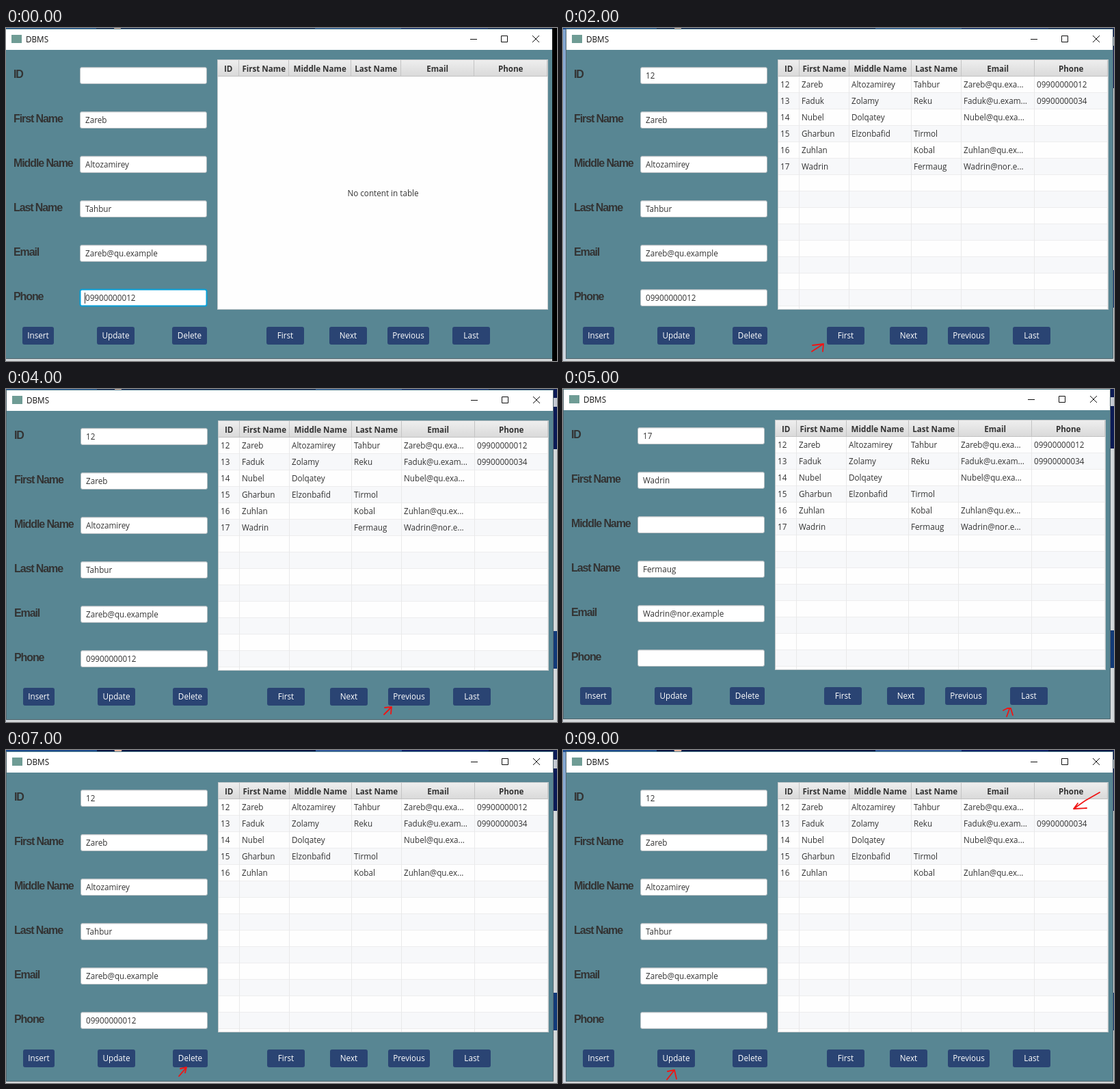
Animation, 806 px wide and 487 px high, one loop 10 s. Source, as an HTML page:

```html
<!DOCTYPE html>
<html lang="en">
<head>
<meta charset="utf-8">
<title>DBMS</title>
<style>
  html, body { margin: 0; width: 100%; height: 100%; overflow: hidden; background: #d4d8da; }
  svg { display: block; width: 806px; height: 487px; }
  text { font: 11.7px "Open Sans", "Noto Sans", sans-serif; fill: #333; white-space: pre; }
  .head { font-weight: 700; font-size: 11.6px; text-anchor: middle; }
  .mid { text-anchor: middle; }
  .button { fill: #fff; text-anchor: middle; }
  .label { font: 700 16px "Liberation Sans", Arial, sans-serif; letter-spacing: -1.1px; }
  .title { fill: #111; }
  .arrow { fill: none; stroke: #f01414; stroke-width: 1.8; stroke-linecap: round; stroke-linejoin: round; }
</style>
</head>
<body>
<svg id="stage" viewBox="0 0 806 487"></svg>
<script>
const SCENE_MS = 1000;
const fieldNames = ["ID", "First Name", "Middle Name", "Last Name", "Email", "Phone"];
const columns = [309, 340, 413, 504, 577, 684, 791];
const buttons = [
  ["Insert", 24, 46], ["Update", 133, 55], ["Delete", 243, 51], ["First", 381, 55],
  ["Next", 473, 55], ["Previous", 558, 61], ["Last", 653, 55]
];
const people = [
  ["12", "Zareb", "Altozamirey", "Tahbur", "Zareb@qu.example", "09900000012"],
  ["13", "Faduk", "Zolamy", "Reku", "Faduk@u.example", "09900000034"],
  ["14", "Nubel", "Dolqatey", "", "Nubel@qu.example", ""],
  ["15", "Gharbun", "Elzonbafid", "Tirmol", "", ""],
  ["16", "Zuhlan", "", "Kobal", "Zuhlan@qu.example", ""],
  ["17", "Wadrin", "", "Fermaug", "Wadrin@nor.example", ""]
];
const withField = (row, index, value) => row.map((old, i) => i === index ? value : old);
const noPhone = withField(people[0], 5, "");
const remaining = people.slice(0, 5);

// Each scene: window offset, form values, table rows, hand-drawn arrow.
const scenes = [
  { at: [0, 0], form: withField(people[0], 0, ""), rows: [], focus: 5, crop: 799 },
  { at: [3, -2], form: [], rows: people.slice(0, 1), crop: 804 },
  { at: [5, 0], form: people[0], rows: people, arrow: "M364 473L381 462M365 464L381 462L380 473" },
  { at: [1, -1], form: people[1], rows: people, arrow: "M465 475L475 465M466 466L475 465L474 474" },
  { at: [1, 0], form: people[0], rows: people, arrow: "M553 476L564 465M554 466L564 465L563 475" },
  { at: [1, -1], form: people[5], rows: people, arrow: "M644 470L650 467H655L658 477M653 468L649 479" },
  { at: [1, 0], form: people[5], rows: people },
  { at: [1, 1], form: people[0], rows: remaining, arrow: "M253 477L264 464M255 466L264 464L262 472" },
  { at: [0, 1], form: noPhone, rows: remaining },
  { at: [5, 1], form: noPhone, rows: [noPhone, ...remaining.slice(1)],
    arrow: "M152 482L163 468M153 470L163 468L166 481M785 62L764 74L747 86M753 78L747 86L766 85" }
];

const rect = (x, y, w, h, fill, extra = "") =>
  `<rect x="${x}" y="${y}" width="${w}" height="${h}" fill="${fill}" ${extra}/>`;
const text = (x, y, value, kind = "") => `<text x="${x}" y="${y}" class="${kind}">${value}</text>`;
const line = (path, color) => `<path d="${path}" fill="none" stroke="${color}"/>`;

function desktop() {
  return rect(-10, -6, 11, 500, "url(#sky)") +
    rect(-10, -6, 142, 8, "#1c4a8c") + rect(132, -6, 690, 8, "#0a1544") +
    rect(452, -6, 126, 8, "#31589c") + rect(578, -6, 127, 8, "#10206a") +
    `<circle cx="163" cy="-3" r="6" fill="#e6b5a0"/>` +
    rect(799, -6, 20, 500, "#d4d8da") + rect(799, -6, 20, 94, "#0b1a55") +
    rect(799, 13, 20, 13, "#c4c9d2") + rect(799, 354, 20, 55, "#123a78");
}

function frame() {
  return rect(-1, 1, 800, 483, "#588693") + rect(-1, 2, 800, 30, "#fff") +
    line("M-.5 1V483.5H799.5V1", "#52666e") +
    rect(8, 10, 15, 12, "#6f9c95") + text(29, 21, "DBMS", "title") +
    line("M679 16.5H689M724.5 11.5H733.5V20.5H724.5ZM770 11L780 21M780 11L770 21", "#111");
}

function form(values, focus) {
  return fieldNames.map((name, i) => {
    const y = 57 + i * 65, focused = i === focus;
    const border = focused ? `stroke="#08a0d8" stroke-width="2"` : `stroke="#b4bcc0"`;
    return text(11, y + 16, name, "label") +
      rect(108.5, y + .5, 185, 24, "#fff", `rx="2.5" ${border}`) +
      (focused ? line(`M115.5 ${y + 5}V${y + 21}`, "#333") : line(`M110 ${y + 1.5}H292`, "#e6e9eb")) +
      text(116, y + 17, values[i] || "");
  }).join("");
}

function shorten(value, column) {
  return column === 4 && value.length > 12 ? value.slice(0, 12) + "..." : value;
}

function table(rows) {
  let out = rect(309, 46, 484, 366, "#fefefe");
  if (rows.length) {
    for (let i = 0; i < 15; i++) {
      const y = 71 + i * 24, h = Math.min(24, 411 - y);
      out += rect(310, y, 482, h, i % 2 ? "#f7f8fa" : "#fefefe");
      if (h === 24) out += line(`M310 ${y + 23.5}H792`, "#ededee");
      (rows[i] || []).forEach((value, c) => out += text(columns[c] + 4, y + 16, shorten(value, c)));
    }
    columns.slice(1).forEach(x => out += line(`M${x + .5} 71V411`, "#e9e9ea"));
  } else {
    out += text(551.5, 246, "No content in table", "mid");
  }
  out += rect(309, 46, 484, 25, "url(#header)") + line("M309 70.5H793", "#c2c2c2");
  fieldNames.forEach((name, i) => {
    out += text((columns[i] + columns[i + 1]) / 2 + .7, 64, name, "head") +
      line(`M${columns[i + 1] + .5} 47V70`, "#c4c4c4");
  });
  return out + rect(309.5, 46.5, 483, 365, "none", `stroke="#c3c8ca"`);
}

function buttonBar() {
  return buttons.map(([name, x, w]) =>
    rect(x, 437, w, 26, "#2a4473", `rx="3"`) + text(x + w / 2, 454, name, "button")).join("");
}

const gradient = (id, from, to) =>
  `<linearGradient id="${id}" x2="0" y2="1"><stop stop-color="${from}"/><stop offset="1" stop-color="${to}"/></linearGradient>`;

function draw({ at, form: values, rows, focus, crop, arrow }) {
  return `<defs>${gradient("header", "#efefef", "#d9d9d9")}${gradient("sky", "#7fa3cf", "#d0d8e0")}</defs>
    <g transform="translate(${at})">${desktop()}${frame()}${form(values, focus)}${table(rows)}${buttonBar()}</g>` +
    (crop ? rect(crop, 0, 806 - crop, 487, "#000") : "") +
    (arrow ? `<path class="arrow" d="${arrow}"/>` : "");
}

const stage = document.getElementById("stage");
const start = performance.now();
let shown = -1;

function tick() {
  const index = Math.floor((performance.now() - start) / SCENE_MS) % scenes.length;
  if (index !== shown) {
    stage.innerHTML = draw(scenes[index]);
    shown = index;
  }
  requestAnimationFrame(tick);
}
tick();
</script>
</body>
</html>
```
